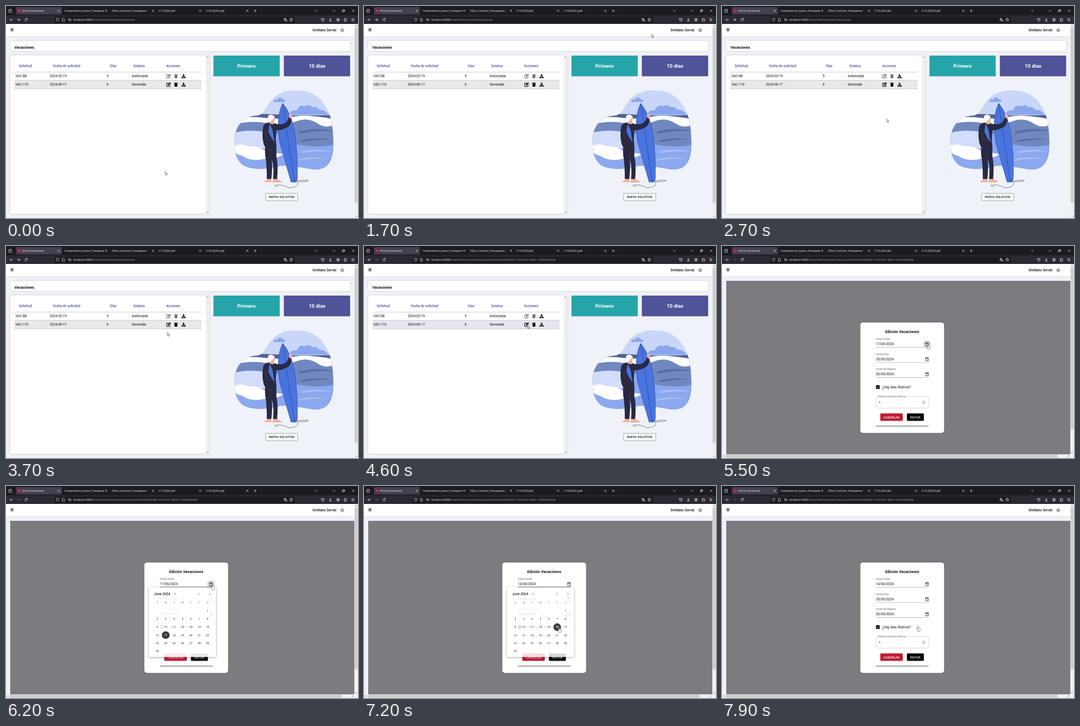
An HTML page for the animation above (8 s loop, 668x402 px).

```html
<!DOCTYPE html>
<html lang="es">
<head>
<meta charset="utf-8">
<title>Vacaciones</title>
<style>
html, body { margin: 0; width: 100%; height: 100%; overflow: hidden; background: #f0f2f9; }
svg { display: block; width: 668px; height: 402px; }
text { font: 6.4px Roboto, sans-serif; fill: #111; white-space: pre; }
.ui text { font: 4.75px "Open Sans", sans-serif; fill: #fbfbfe; }
.ui .url { font-size: 5.26px; }
.url .path { fill: #9b9aa5; }
.line { fill: none; stroke: #e8e8ee; stroke-width: .75; stroke-linecap: round; stroke-linejoin: round; }
.head text { font-weight: 500; fill: #50529a; }
.bold { font-weight: 700; }
.mid { text-anchor: middle; }
.card { fill: #fff; filter: drop-shadow(0 .8px 1.5px #0003); }
.btn { font-weight: 500; letter-spacing: .15px; text-anchor: middle; }
.days text { font-size: 5.1px; text-anchor: middle; }
.days .name { fill: #777; font-size: 4.9px; }
.days .on { fill: #fff; font-weight: 500; }

[class^="t-"], .label, #cal { animation: 8s step-end -10ms infinite; }
.t-url1 { animation-name: url1; }
.t-url2 { animation-name: url2; }
.t-list { animation-name: list; }
.t-modal { animation-name: modal; }
.t-arrow { animation-name: arrow; }
.t-hand { animation-name: hand; }
.t-halo { animation-name: halo; }
.t-focus { animation-name: focus; }
.t-old { animation-name: old; }
.t-new { animation-name: new; }
.t-hover { animation-name: hover; }
.t-alert { animation-name: alert; }
.label { animation-name: label; font-size: 4.85px; fill: #666; }
#cal { animation-name: cal; }
@keyframes url1 { 0% { opacity: 1 } 57.5%, to { opacity: 0 } }
@keyframes url2 { 0% { opacity: 0 } 57.5%, to { opacity: 1 } }
@keyframes list { 0% { opacity: 1 } 58.75%, to { opacity: 0 } }
@keyframes modal { 0% { opacity: 0 } 58.75%, to { opacity: 1 } }
@keyframes arrow { 0% { opacity: 1 } 66.25%, to { opacity: 0 } }
@keyframes hand { 0% { opacity: 0 } 66.25%, to { opacity: 1 } }
@keyframes halo { 0% { opacity: 0 } 67.5% { opacity: 1 } 80%, to { opacity: 0 } }
@keyframes focus { 0% { opacity: 0 } 76.25% { opacity: 1 } 93.75%, to { opacity: 0 } }
@keyframes old { 0% { opacity: 1 } 90%, to { opacity: 0 } }
@keyframes new { 0% { opacity: 0 } 90%, to { opacity: 1 } }
@keyframes hover { 0% { opacity: 0 } 85% { opacity: 1 } 90%, to { opacity: 0 } }
@keyframes alert { 0% { opacity: 1 } 60% { opacity: .4 } 61.25%, to { opacity: 0 } }
@keyframes label {
  0% { transform: translateY(7.3px) scale(1.25); fill: #b8273c }
  60% { transform: translateY(2px) scale(1.07); fill: #8c4a54 }
  61.25%, to { transform: none; fill: #666 }
}
@keyframes cal {
  0% { opacity: 0 } 76.25% { opacity: .5 } 77.5% { opacity: .9 } 78.75% { opacity: 1 }
  90% { opacity: .85 } 91.25% { opacity: .45 } 92.5% { opacity: .12 } 93.75%, to { opacity: 0 }
}
</style>
</head>
<body>
<svg viewBox="0 0 668 402">
<defs>
  <path id="x" class="line" d="M-1.5-1.5 1.5 1.5M1.5-1.5-1.5 1.5"/>
  <g id="edit">
    <path d="M.8-2.9H-2.4Q-3.6-2.9-3.6-1.8V2.6Q-3.6 3.7-2.4 3.7H1.8Q2.9 3.7 2.9 2.6V.4" fill="none" stroke="currentColor" stroke-width="1.1"/>
    <path d="M-1.6 2-1.2-.2 2.5-3.8Q3.2-4.4 3.9-3.7 4.5-3 3.9-2.3L.4 1.4Z" fill="currentColor"/>
  </g>
  <path id="bin" d="M-3.4-3.5H-1.4L-.9-4.1H.9L1.4-3.5H3.4V-2.5H-3.4ZM-2.9-2H2.9L2.5 3.3Q2.4 4 1.7 4H-1.7Q-2.4 4-2.5 3.3Z" fill="currentColor"/>
  <path id="save" d="M-.8-4H.8V-1H2.9L0 2-2.9-1H-.8ZM-4 1.4H-1.9L0 3 1.9 1.4H4V3.8H-4Z" fill="currentColor"/>
  <g id="date" fill="none" stroke="#444" stroke-width=".8">
    <path d="M-2.9-2.6H2.9V3.3H-2.9ZM-1.7-3.7V-2.4M1.7-3.7V-2.4"/>
    <path d="M-2.9-1.8H2.9" stroke-width="1.4"/><path d="M.3.6H1.9V2.1H.3Z" fill="#444" stroke="none"/>
  </g>
  <path id="up" d="M-1.6 .8 0-.8 1.6 .8" fill="none" stroke="#555" stroke-width=".9"/>
  <linearGradient id="fade"><stop offset="0" stop-color="#1c1b22" stop-opacity="0"/><stop offset="1" stop-color="#1c1b22"/></linearGradient>
  <clipPath id="blob"><path d="M434 263C431 230 450 209 474 208 492 207 492 190 506 176 518 164 532 160 549 160 586 160 598 177 606 190 620 208 622 246 621 270 619 300 606 311 584 310 562 307 546 302 520 303 494 310 470 311 452 303 439 295 434 280 434 263Z"/></clipPath>
</defs>

<rect width="668" height="402" fill="#f0f2f9"/>

<g class="ui">
  <rect width="668" height="18" fill="#1c1b22"/>
  <rect y="17.5" width="668" height="16.5" fill="#2b2a33"/>
  <rect x="19" y="2" width="87" height="14" rx="1.8" fill="#42414d"/>
  <rect x="92" y="20" width="456" height="12.5" rx="2" fill="#1c1b22"/>
  <rect x="22.5" y="6.5" width="5" height="5" fill="#e5146c"/>
  <text x="30.5" y="10.8">Firmar Documento</text>
  <text x="111" y="10.8">Comprobacion_Gastos_Transparen</text>
  <text x="201" y="10.8">Oficio_Comision_Transparencia_V-</text>
  <text x="290" y="10.8">V-16-2024.pdf</text>
  <text x="379.5" y="10.8">V-16-2024-2.pdf</text>
  <path d="M179 4h8v10h-8zM267 4h8v10h-8z" fill="url(#fade)"/>
  <path d="M186.5 4h2v10h-2zM274.500 4h3v10h-3z" fill="#1c1b22"/>
  <use href="#x" x="100" y="9"/><use href="#x" x="190" y="9"/><use href="#x" x="279" y="9"/>
  <use href="#x" x="368.500" y="9"/><use href="#x" x="458" y="9"/><use href="#x" x="659" y="9"/>
  <g class="line">
    <path d="M5.500 8H10.500V12H5.500ZM6 6.300H10M471 9H475M473 7V11M587 8 589 10 591 8M620.500 9H624.500M638.500 8H641.500V11H638.500ZM639.700 7H642.500V9.800"/>
    <path d="M7.500 26H12.700M9.700 23.800 7.500 26 9.700 28.200"/>
    <path d="M40.300 24.500A2.500 2.500 0 1 0 40.600 27M40.600 23V25H38.500"/>
    <path d="M98 23.200 100.300 24V26Q100 28 98 29 96 28 95.700 26V24ZM107.200 23.300H109.500L111 25V28.700H107.200ZM118.500 24.800H123.500M118.500 27.200H123.500M119.700 23.700 118.500 24.800M122.300 28.300 123.500 27.200"/>
    <path d="M527 24H531M529 23V24M530.300 24Q529.500 26.500 527.200 27.300M528 25Q529 26.700 530.500 27.200M530 29 531.700 25.500 533.300 29M530.700 28H532.700"/>
    <path d="M541.300 22.800 542.200 24.900 544.400 25.100 542.700 26.600 543.300 28.800 541.300 27.600 539.300 28.800 539.900 26.600 538.200 25.100 540.400 24.900Z"/>
    <path d="M598.700 23.700H603.700V26Q603.500 28.500 601.200 28.700 599 28.500 598.700 26ZM600 25.300 601.200 26.500 602.400 25.300"/>
    <path d="M615.500 23V27M613.700 25.300 615.500 27 617.300 25.300M613 28.500H618M642 24.500H643.300V23.300H644.700V24.500H646.500V28.700H642V27H643V26H642ZM656 24H660.500M656 26H660.500M656 28H660.500"/>
    <circle cx="630" cy="26" r="2.700"/><circle cx="630" cy="25.200" r=".9"/><path d="M628.300 28Q630 26.500 631.700 28"/>
  </g>
  <path class="line" d="M21.300 26H26.500M24.300 23.800 26.500 26 24.300 28.200" opacity=".3"/>
  <g class="t-url1">
    <path class="line" d="M21.300 26H26.500M24.300 23.800 26.500 26 24.300 28.200"/>
    <text class="url" x="127.500" y="27.900">localhost:3000<tspan class="path">/Index/Administrativo/Vacaciones</tspan></text>
  </g>
  <g class="t-url2"><text class="url" x="127.500" y="27.900">localhost:3000<tspan class="path">/Index/Administrativo/Vacaciones/Editar/2fedec88-1e79-4e41-98da-1af50429b0d8</tspan></text></g>
</g>

<rect x="0" y="34" width="661" height="23.500" class="card"/>
<path d="M8.500 43H14M8.500 45H14M8.500 47H14" stroke="#555" stroke-width="1.300"/>
<text x="627" y="48.200" text-anchor="end" style="font-size:6.500px;font-weight:500">Emiliano Sorval</text>
<g fill="none" stroke="#555"><circle cx="638" cy="46" r="2.500" stroke-width=".8"/><circle cx="638" cy="46" r="3.200" stroke-width=".9" stroke-dasharray="1.200 1.313"/><circle cx="638" cy="46" r="1" stroke-width=".6"/></g>
<rect x="661" y="34" width="7" height="368" fill="#f0f0f0"/>
<use href="#up" x="664.500" y="37.500"/>

<g class="t-list">
  <rect x="661.500" y="41" width="6" height="332" fill="#cdcdcd"/>
  <use href="#up" transform="translate(664.500 398.500) scale(1 -1)"/>
  <rect class="card" x="8" y="66" width="645.500" height="19.500" rx="4"/>
  <text class="bold" x="16" y="80.500" style="font-size:7.200px">Vacaciones</text>
  <rect class="card" x="8" y="93.500" width="378" height="300.500" rx="4"/>
  <rect x="379" y="93.500" width="7" height="300.500" fill="#f0f0f0"/>
  <use href="#up" x="382.500" y="97"/><use href="#up" transform="translate(382.500 391) scale(1 -1)"/>
  <g class="head">
    <text x="24" y="115.500">Solicitud</text><text x="89" y="115.500">Fecha de solicitud</text><text x="197" y="115.500">Días</text>
    <text x="242" y="115.500">Estatus</text><text x="304" y="115.500">Acciones</text>
  </g>
  <rect x="16" y="141" width="355" height="16" fill="#e9e9e9"/>
  <g class="t-url2"><rect x="16" y="141" width="355" height="16" fill="#e7e6f0"/></g>
  <path d="M16 125.300H371M16 141H371M16 157H371" stroke="#bdbdbd" stroke-width=".8"/>
  <text x="18" y="135.300">VAC-88</text><text x="83" y="135.300">2024-02-19</text><text x="191" y="135.300">5</text><text x="238.500" y="135.300">Autorizada</text>
  <text x="18" y="151.300">VAC-110</text><text x="83" y="151.300">2024-06-17</text><text x="191" y="151.300">6</text><text x="238.500" y="151.300">Generada</text>
  <g color="#707070"><use href="#edit" x="308.500" y="133"/><use href="#bin" x="322.500" y="133"/></g>
  <use href="#save" x="337" y="133"/><use href="#edit" x="308.500" y="149"/><use href="#bin" x="322.500" y="149"/><use href="#save" x="337" y="149"/>

  <rect x="393.700" y="94" width="125.800" height="39.300" fill="#26a5a9"/>
  <rect x="527.300" y="94" width="125.800" height="39.300" fill="#515398"/>
  <g class="mid"><text class="bold" x="456.500" y="117" style="font-size:9.700px;fill:#fff">Primero</text><text class="bold" x="590.300" y="117" style="font-size:9.600px;fill:#fff">10 días</text></g>

  <g clip-path="url(#blob)">
    <rect x="430" y="155" width="195" height="160" fill="#c9d6f8"/>
    <path d="M507 182Q508 175 514 178 519 169 525 177 530 176 530 182ZM538 206Q540 196 552 198 556 186 568 190 576 185 581 192 590 190 594 197 606 196 612 206Z" fill="#89a7ee"/>
    <path d="M430 207Q470 203 520 206T625 206V315H430Z" fill="#52648f"/>
    <path d="M430 215Q460 208 490 212T545 210 625 215V315H430Z" fill="#fff"/>
    <path d="M430 226Q462 216 495 222T550 219 590 222 625 224V315H430Z" fill="#7088bf"/>
    <path d="M430 241Q460 233 495 239T530 246L548 262Q590 270 625 263V315H430Z" fill="#8ca8ee"/>
    <path d="M430 241Q460 233 495 239V270H430Z" fill="#d3ddf9"/>
    <path d="M430 268Q445 258 460 266 478 264 494 276L528 281Q510 291 490 290 466 296 448 284 438 282 430 274Z" fill="#fff"/>
    <path d="M556 238Q590 229 625 237 590 236 556 242ZM560 255Q590 248 616 253 590 253 560 258Z" fill="#596da4"/>
    <path d="M562 276Q590 269 620 276 590 274 562 279ZM556 290Q585 284 610 290 584 288 556 293Z" fill="#a9bef4"/>
  </g>
  <g>
    <path d="M525 184.500Q541 202 548 240 554 281 553 325 553 332 550 334H541Q532 302 520 262 511 212 525 184.500Z" fill="#4974df" stroke="#29438c" stroke-width=".6"/>
    <path d="M525 185Q534 245 547 333" fill="none" stroke="#233a78" stroke-width=".6"/>
    <path d="M547 330Q562 336 574 331 561 328 553 334 557 343 538 345 522 337 510 340 512 343 516 342" fill="none" stroke="#333" stroke-width=".6"/>
    <path d="M497 328H503L504 334H489Q492 331 497 328ZM508 328H515Q519 331 523 332V334.500H505Z" fill="#f0b09c"/>
    <path d="M500 221Q490 221 488 229 485 246 489 262L492 268Q491 276 492 284 495 300 495 328H503.500Q506 307 504 290L507 300Q508 313 507 328H514.500Q517 303 513 284 514 268 512 253L513 236Q527 235 537 228 542 221 542.500 211L537 209Q535 220 528 223 516 226 509 222Z" fill="#292942"/>
    <path d="M500 223Q507 233 508 249L510 258Q502 250 498 238Z" fill="#4776dc"/>
    <path d="M495 236Q492 248 496 255L510 252M504 270Q502 281 504 290" fill="none" stroke="#494968" stroke-width=".6"/>
    <path d="M537 211Q536 204 540 204L544 210 542 215Z" fill="#f0b09c"/>
    <path d="M500 217H509V223Q505 226 500 222Z" fill="#f0b09c"/>
    <path d="M497 214Q496 206 503 206 510 207 510 213L508 218 503 215Q505 219 501 220 497 219 497 214Z" fill="#fff" stroke="#b9bed0" stroke-width=".4"/>
    <path d="M507 212Q511 214 509.500 218 508 221 505.500 219Z" fill="#f0b09c"/>
  </g>
  <rect x="492.700" y="355.300" width="61" height="13.700" rx="1" fill="#f8f9fc" stroke="#858585" stroke-width=".7"/>
  <text class="btn" x="523.300" y="364.200" style="font-size:5.500px">NUEVA SOLICITUD</text>
</g>

<g class="t-modal">
  <rect x="0" y="59" width="661" height="343" fill="#f0f2f9"/>
  <rect x="8" y="66" width="653" height="329" fill="#7b7c80"/>
  <rect x="661" y="41" width="7" height="361" fill="#f0f0f0"/>
  <rect x="0" y="395" width="668" height="7" fill="#f0f0f0"/>
  <path d="M661.500 41h6V347h-6ZM7 395.500H637V401.500H7Z" fill="#cdcdcd"/>
  <use href="#up" transform="translate(664.500 392) scale(1 -1)"/>
  <use href="#up" transform="translate(3.500 398.500) rotate(-90)"/><use href="#up" transform="translate(657.500 398.500) rotate(90)"/>
  <rect class="card" x="262.500" y="145" width="159" height="209.500" rx="5"/>
  <text class="bold mid" x="342" y="164.600" style="font-size:7.400px">Edición Vacaciones</text>
  <g id="fields"></g>
  <g class="t-focus"><path d="M292 191.800H392" stroke="#222" stroke-width="1.100"/></g>
  <g class="t-halo"><circle cx="389" cy="185.800" r="7.500" fill="#0002"/></g>
  <rect x="292.300" y="264" width="7" height="7" rx="1"/>
  <path d="M293.800 267.500 295.200 269 298 266" fill="none" stroke="#fff" stroke-width=".9"/>
  <text x="304" y="269.700">¿Hay días festivos?</text>
  <rect x="292.300" y="285.700" width="99.500" height="21.700" rx="2" fill="none" stroke="#bbb" stroke-width=".6"/>
  <path d="M296 285.700H351.500" stroke="#fff" stroke-width="1.600"/>
  <text x="297.300" y="287.300" style="font-size:4.800px;fill:#666">Número de días festivos</text>
  <text x="297.300" y="298.900">1</text>
  <rect x="379.500" y="293" width="6.500" height="7" fill="#e6e6e6"/>
  <path d="M381.500 295.700 382.800 294.400 384.100 295.700M381.500 297.400 382.800 298.700 384.100 297.400" fill="none" stroke="#777" stroke-width=".6"/>
  <g class="card"><rect x="300.500" y="317.500" width="42.500" height="14" rx="1.500" fill="#c31c35"/><rect x="351" y="317.500" width="32" height="14" rx="1.500" fill="#000"/></g>
  <text class="btn" x="321.800" y="326.500" style="font-size:5.600px;fill:#fff">CANCELAR</text>
  <text class="btn" x="367" y="326.500" style="font-size:5.600px;fill:#fff">EDITAR</text>
  <path d="M292 341.500H392" stroke="#222" stroke-width=".8"/>

  <g id="cal">
    <rect x="271" y="191.700" width="127.500" height="132.500" rx="2" fill="#fff" style="filter:drop-shadow(0 1px 2px #0006)"/>
    <text x="281" y="207.200" style="font-size:6.500px;font-weight:500">June 2024</text>
    <path d="M318.800 204H322.800L320.800 206Z" fill="#666"/>
    <path d="M367.200 202.700 365 205 367.200 207.300M385.800 202.700 388 205 385.800 207.300" fill="none" stroke="#555" stroke-width=".8"/>
    <g id="days" class="days"></g>
  </g>
</g>

<g id="cursor" stroke="#222" stroke-width=".55" stroke-linejoin="round" fill="#fff">
  <path class="t-arrow" d="M0 0V6.400L1.500 5 2.500 7.400 3.500 7 2.500 4.700H4.600Z"/>
  <path class="t-hand" d="M-.7 .7Q0-.5 .7 .7V3.300Q1.500 2.800 2 3.600 2.700 3.200 3.200 4 4.200 3.700 4.300 4.800V7Q4 8.500 3.300 9.600H.2Q-.7 8-2.300 6 -2.400 4.900-1.500 5.200L-.7 6Z"/>
</g>
</svg>
<script>
const LOOP = 8000;
const $ = id => document.getElementById(id);

const field = (name, value, y) => `<g transform="translate(292 ${y})">
  ${value}
  <path d="M0 4.300H100" stroke="#888" stroke-width=".6"/>
  <g class="t-alert"><path d="M0 4.300H100" stroke="#c5304a" stroke-width=".9"/></g>
  <use href="#date" x="97" y="-2"/>
  <g transform="translate(0 -9.800)"><text class="label">${name}</text></g></g>`;
const plain = s => `<text>${s}</text>`;
const startDate = `<text class="t-old">17/06/2024</text><text class="t-new">14/06/2024</text>`;
$('fields').innerHTML =
  field('Fecha Inicial', startDate, 188) +
  field('Fecha Final', plain('25/06/2024'), 216.6) +
  field('Fecha de Regreso', plain('26/06/2024'), 245.2);

const colX = c => 287.2 + 15.88 * c;
const dayPos = d => [colX((d + 5) % 7), 237.4 + 15.1 * Math.floor((d + 5) / 7)];
const dayText = (d, cls = '') => {
  const [x, y] = dayPos(d);
  return `<text class="${cls}" x="${x}" y="${y + 1.8}">${d}</text>`;
};
const disc = (d, fill) => {
  const [x, y] = dayPos(d);
  return `<circle cx="${x}" cy="${y}" r="7.3" fill="${fill}"/>`;
};
const picked = (d, cls) => `<g class="${cls}">${disc(d, '#222')}${dayText(d, 'on')}</g>`;
let days = `<g class="t-hover">${disc(14, '#ececec')}</g>`;
[...'SMTWTFS'].forEach((s, c) => days += `<text class="name" x="${colX(c)}" y="223.2">${s}</text>`);
for (let d = 1; d <= 30; d++) days += dayText(d);
$('days').innerHTML = days + picked(17, 't-old') + picked(14, 't-new');

// Pointer stops: time, x, y; it advances once every 100 ms.
const stops = [
  [0, 302, 313.5], [400, 302, 312], [600, 302, 311], [1000, 303, 311], [1200, 303, 311],
  [1500, 440, 170], [1700, 545.5, 53], [1800, 575, 43], [2100, 283, 347], [2400, 336, 221],
  [2600, 336, 221], [2900, 265, 199], [3100, 331, 217], [3200, 331, 217], [3700, 306, 163.5],
  [4100, 310.5, 150], [4700, 310.5, 150], [5400, 390, 186], [5700, 391.3, 187], [6200, 391.3, 187],
  [6800, 369, 267], [6900, 370, 268], [7700, 370, 268], [7900, 371.7, 266], [LOOP, 371.7, 266]
];
$('cursor').animate(stops.map(([t, x, y], i) => ({
  offset: t / LOOP,
  transform: `translate(${x}px, ${y}px)`,
  easing: i + 1 < stops.length ? `steps(${(stops[i + 1][0] - t) / 100})` : 'linear'
})), { duration: LOOP, iterations: Infinity, delay: -10 });
</script>
</body>
</html>
```
